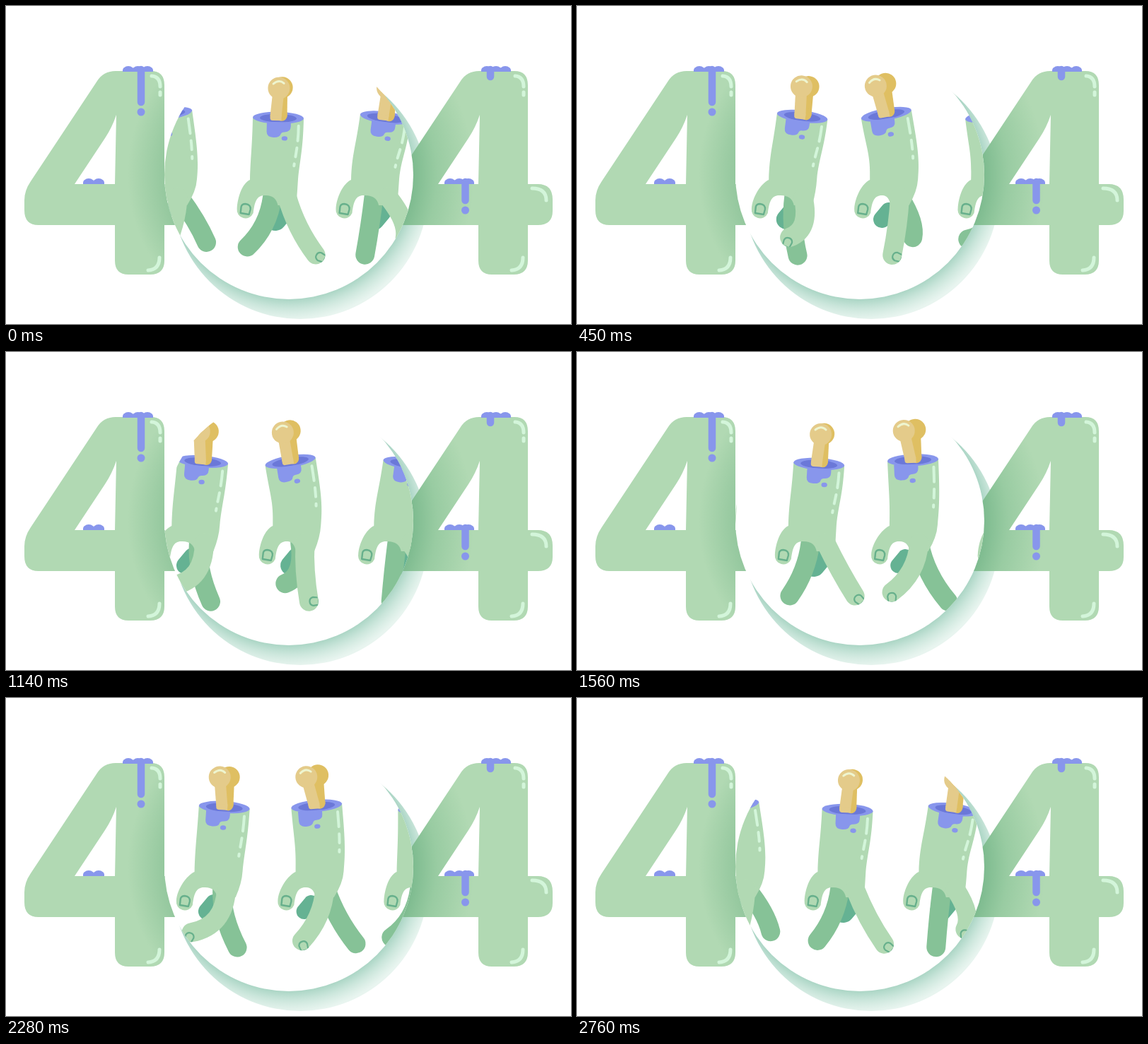
Recreate the animation shown at these times as an HTML page with a canvas. Size 799 by 450 pixels, loop 2790 ms.

```html
<!DOCTYPE html>
<html lang="en">
<head>
<meta charset="utf-8">
<title>404</title>
<style>
html, body { margin: 0; width: 100%; height: 100%; overflow: hidden; background: #fff; }
canvas { display: block; }
</style>
</head>
<body>
<canvas id="stage" width="799" height="450"></canvas>
<script>
const ctx = document.getElementById('stage').getContext('2d');
const LOOP = 2790, STEP = 30, SPACING = 143, GAIT = 1400;
const PHASES = [0, 0.4, 0.84];
const HOLE = { x: 400, y: 239, r: 176 };
const C = {
  skin: '#b1d9b3', far: '#86c297', curl: '#65b293', nail: '#67b08c', shine: '#d3f5da',
  blue: '#8896ec', inside: '#6b78d8', bone: '#e4cb8a', boneBack: '#dfbf62', boneShine: '#eef5cf'
};

// Eight evenly spaced poses of a walking finger; x is relative to the hand.
const TIP_X = [98, 75, 49, 28, 10, 0, 46, 91];
const TIP_Y = [352, 353, 353, 351, 341, 332, 327, 331];
const MID_X = [74, 60, 48, 41, 36, 36, 60, 81];
const MID_Y = [313, 310, 310, 310, 309, 312, 306, 302];

const wave = (phase, mean, size, peak) => mean + size * Math.cos(2 * Math.PI * (phase - peak));

function sample(list, phase) {
  const n = list.length, u = (phase - Math.floor(phase)) * n, i = Math.floor(u), f = u - i;
  const [a, b, c, d] = [-1, 0, 1, 2].map(k => list[(i + k + n) % n]);
  return b + f / 2 * (c - a + f * (2 * a - 5 * b + 4 * c - d + f * (3 * (b - c) + d - a)));
}

function fill(path, color) {
  ctx.fillStyle = color;
  ctx.fill(path instanceof Path2D ? path : new Path2D(path));
}

function stroke(path, color, width, cap = 'round') {
  ctx.strokeStyle = color;
  ctx.lineWidth = width;
  ctx.lineCap = cap;
  ctx.lineJoin = 'round';
  ctx.stroke(new Path2D(path));
}

function oval(x, y, rx, ry, color) {
  ctx.beginPath();
  ctx.ellipse(x, y, rx, ry, 0, 0, 2 * Math.PI);
  ctx.fillStyle = color;
  ctx.fill();
}

function radial(inner, outer, stops) {
  const g = ctx.createRadialGradient(HOLE.x, HOLE.y, inner, HOLE.x, HOLE.y, outer);
  stops.forEach(([at, color]) => g.addColorStop(at, color));
  return g;
}

// ---- Digits ----
const FOUR = 'M155 92H205Q224 92 224 112V252H238Q259 252 259 274V290Q259 310 238 310H224V360Q224 380 204 380' +
  'H173Q154 380 154 360V310H46Q26 310 26 289V275Q26 261 35 248L129 106Q138 92 155 92Z' +
  'M156 154Q150 172 140 187L97 252H154Z';

function slime(x, y, width, dripX, dripEnd, dot) {
  ctx.save();
  ctx.beginPath();
  ctx.rect(x, y - 10, width, 10);
  ctx.clip();
  const bumps = width > 35 ? 3 : 2;
  for (let i = 0; i < bumps; i++) {
    const f = i / (bumps - 1);
    oval(x + 8 + f * (width - 16), y, 8.5, 8, C.blue);
  }
  ctx.restore();
  if (dripX) stroke(`M${dripX} ${y - 3}V${dripEnd - 5}`, C.blue, 10.5);
  if (dot) oval(dripX, dot, 5.5, 5.5, C.blue);
}

function four(dx, shade) {
  const shape = new Path2D(FOUR);
  ctx.save();
  ctx.translate(dx, 0);
  fill(shape, C.skin);
  ctx.clip(shape);
  ctx.translate(-dx, 0);
  ctx.fillStyle = shade;
  ctx.fillRect(0, 80, 799, 310);
  ctx.restore();
  ctx.save();
  ctx.translate(dx, 0);
  stroke('M206 99Q218 100 218 114M218 122V126M201 374Q217 373 217 356', C.shine, 5);
  ctx.restore();
}

function scenery() {
  ctx.fillStyle = '#fff';
  ctx.fillRect(0, 0, 799, 450);
  oval(416, 262, 181, 181, radial(174, 206, [
    [0, 'rgba(112,184,156,.62)'], [0.45, 'rgba(128,194,168,.42)'], [1, 'rgba(160,212,190,.24)']
  ]));
  four(0, radial(176, 228, [[0, 'rgba(110,176,130,.42)'], [1, 'rgba(110,176,130,0)']]));
  four(514, radial(174, 262, [
    [0, 'rgba(104,174,128,.72)'], [0.4, 'rgba(110,180,132,.36)'], [1, 'rgba(110,180,132,0)']
  ]));
  stroke('M744 258Q764 258 764 275', C.shine, 5);
  slime(165, 93, 43, 191, 141, 150);
  slime(109, 252, 30);
  slime(672, 93, 42, 685, 105);
  slime(620, 252, 42, 649.5, 280, 289);
  oval(HOLE.x, HOLE.y, HOLE.r, HOLE.r, '#fff');
}

// ---- Hands ----
function fingerPose(x, phase, shift = 0) {
  return {
    base: [x + wave(phase, 52, 6, 0.93) + shift * 0.9, 270],
    mid: [x + sample(MID_X, phase) + shift, sample(MID_Y, phase)],
    tip: [x + sample(TIP_X, phase) + shift * 0.8, sample(TIP_Y, phase)]
  };
}

function drawFinger({ base, mid, tip }, color) {
  const bend = mid.map((m, i) => 2 * m - (base[i] + tip[i]) / 2);
  stroke(`M${base}Q${bend} ${tip}`, color, 27);
}

function fingerNail([x, y], phase) {
  const angle = wave(phase, 55, -60, 0.17) * Math.PI / 180;
  ctx.save();
  ctx.beginPath();
  ctx.arc(x, y, 13.5, 0, 2 * Math.PI);
  ctx.clip();
  ctx.translate(x + 8 * Math.cos(angle), y + 8 * Math.sin(angle));
  ctx.rotate(angle - Math.PI / 2);
  stroke('M-5 6L-6 -2Q-5 -7 0 -7Q5 -7 6 -2L5 6Z', C.nail, 2.2);
  ctx.restore();
}

function stump(slide, phase) {
  const back = wave(phase, 10.5, -6, -0.04);
  oval(0, 0, 36, 8.5, C.blue);
  oval(0, 0.5, 26, 6, C.inside);
  fill('M-16 4V20Q-16 28 -6 28Q3 28 4 23Q5 20 9 20Q18 20 18 12V4Z'.replace(/^/, ''), 'rgba(0,0,0,0)');
  ctx.save();
  ctx.translate(slide, 0);
  fill('M-16 6V20Q-16 28 -6 28Q3 28 4 23Q5 20 9 20Q18 20 18 12V6Z', C.blue);
  oval(9.5, 29, 4.2, 3.2, C.blue);
  ctx.restore();
  stroke(`M${slide + back} -42L5 -2`, C.boneBack, 15, 'butt');
  stroke(`M5 -6V-3`, C.boneBack, 15);
  oval(slide + back, -43, 15, 15, C.boneBack);
  stroke(`M${slide} -42L-3.5 -2`, C.bone, 16, 'butt');
  fill('M-11.5 -4H4.5V4H-8Q-11.5 4 -11.5 0Z', C.bone);
  oval(slide, -42, 15.5, 15.5, C.bone);
  stroke(`M${slide - 8} -48Q${slide} -55 ${slide + 7} -49`, C.boneShine, 3);
}

function hand(x, phase) {
  const tilt = wave(phase, -1, 9, 0.79) * Math.PI / 180;
  const cos = Math.cos(tilt), sin = Math.sin(tilt);
  const wrist = [x + wave(phase, 41, 13, 0.8), wave(phase, 155.5, 3, 0.93)];
  const at = (u, v) => [wrist[0] + u * cos - v * sin, wrist[1] + u * sin + v * cos];
  const thumb = [x + wave(phase, -5, 4, 0.07), 289];
  const [tx, ty] = thumb;
  const near = fingerPose(x, phase);
  const far = fingerPose(x, phase + 0.5, -11);
  const nx = near.base[0];

  const curl = x + wave(phase, 29, 12, 0.97);
  stroke(`M${curl + 10} 290L${curl} 302`, C.curl, wave(phase, 27, 5, 0.97));
  drawFinger(far, C.far);

  fill(`M${at(-36, 0)}C${at(-36, 45)} ${x + 6} 210 ${x + 5} 246` +
    `C${x - 6} 251 ${tx - 11} 270 ${tx - 12} ${ty - 2}` +
    `A12 12 0 0 0 ${tx + 11} ${ty + 4}` +
    `C${tx + 13} 277 ${tx + 16} 268 ${tx + 27} 268Q${nx - 16} 267 ${nx - 13} 282` +
    `L${nx + 13} 282Q${x + 72} 262 ${x + 73} 245` +
    `C${x + 76} 215 ${at(36, 45)} ${at(36, 0)}Z`, C.skin);
  drawFinger(near, C.skin);
  fingerNail(near.tip, phase);

  ctx.save();
  ctx.translate(tx, ty - 1);
  stroke('M-7 5L-6 -4Q-5 -8 0 -8Q8 -7 7 0L5 7Z', C.nail, 2.4);
  ctx.restore();

  ctx.setLineDash([21, 10, 13, 10, 3, 300]);
  stroke(`M${at(29, 11)}C${at(29, 45)} ${x + 68} 213 ${x + 65} 245`, C.shine, 4);
  ctx.setLineDash([]);

  ctx.save();
  ctx.translate(...wrist);
  ctx.rotate(tilt);
  stump(wave(phase, -5.5, 5.5, 0), phase);
  ctx.restore();
}

function draw(t) {
  scenery();
  ctx.save();
  ctx.beginPath();
  ctx.arc(HOLE.x, HOLE.y, HOLE.r, 0, 2 * Math.PI);
  ctx.clip();
  for (let n = -2; n <= 4; n++) {
    const x = 340 + 3 * SPACING * t / LOOP - SPACING * n;
    if (x > 60 && x < 640) hand(x, t / GAIT + PHASES[(n + 3) % 3]);
  }
  ctx.restore();
}

const start = performance.now();
function tick() {
  const elapsed = (performance.now() - start) % LOOP;
  draw(Math.floor(elapsed / STEP) * STEP);
  requestAnimationFrame(tick);
}
tick();
</script>
</body>
</html>
```
